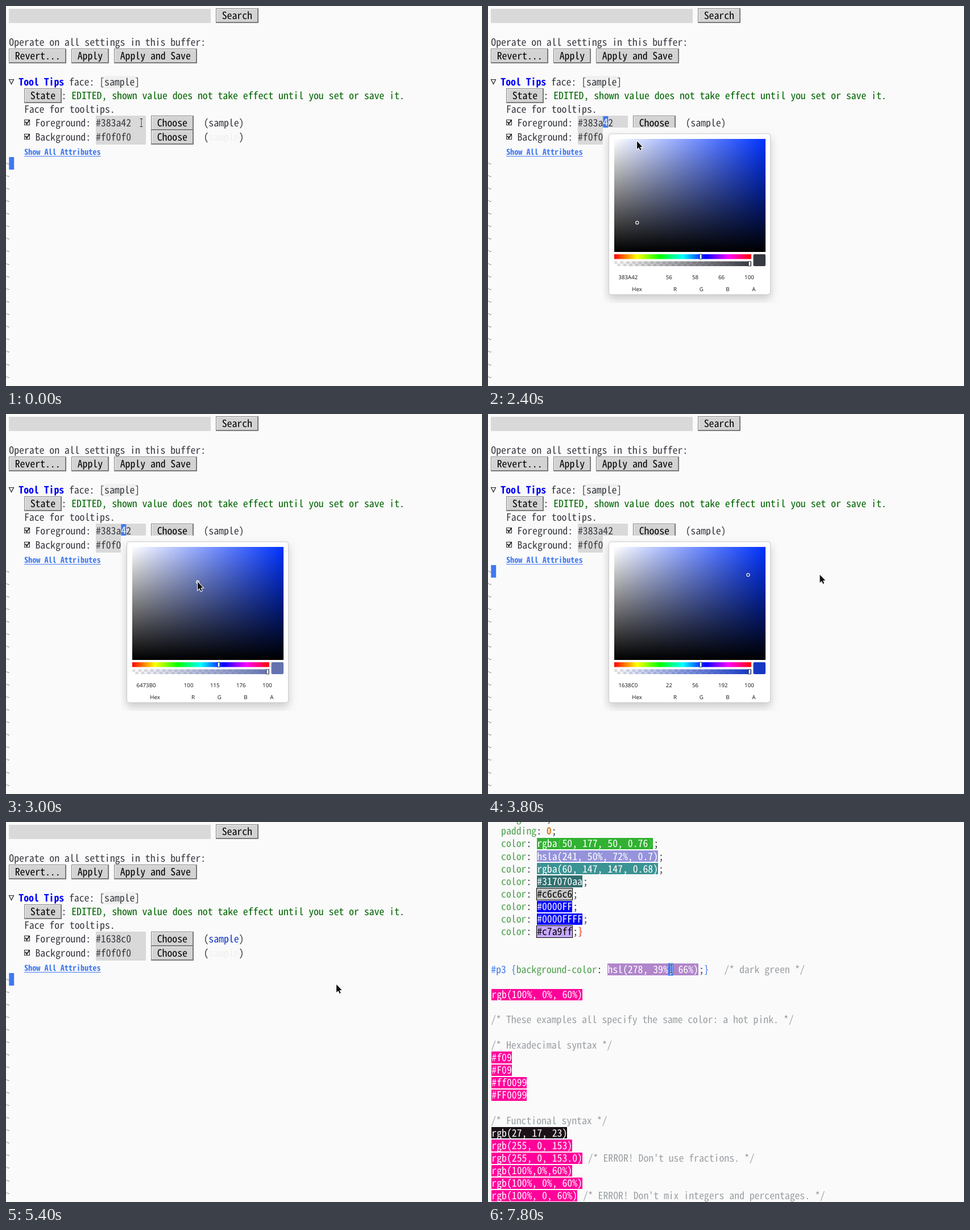
Animation, 837 px wide and 669 px high, one loop 8000 ms. Source, as an HTML page with a canvas:

```html
<!DOCTYPE html>
<html lang="en">
<head>
<meta charset="utf-8">
<title>Color picker</title>
<style>
  html, body { margin: 0; width: 100%; height: 100%; overflow: hidden; background: #fafafa; }
  canvas { display: block; }
</style>
</head>
<body>
<canvas id="stage" width="837" height="669"></canvas>
<script>
const ctx = document.getElementById('stage').getContext('2d');
const LOOP = 8000, ADV = 8.87, ROW = 22.14, LEFT = 5.3;
const MONO = '"Noto Sans Mono CJK JP", "Noto Sans Mono", monospace';
const BG = '#fafafa', INK = '#383a42', FIELD = '#d9d9d9', BLUE = '#4078f2';
const GREEN = '#50a14f', GREY = '#9ca0a4', PINK = '#ff0099';

ctx.textRendering = 'geometricPrecision';
ctx.font = '100px ' + MONO;
const EM = 100 / ctx.measureText('0').width;

function rect(x, y, w, h, color) {
  ctx.fillStyle = color;
  ctx.fillRect(x, y, w, h);
}

function shape(points, fill, stroke, width = 1) {
  ctx.beginPath();
  points.forEach(([x, y]) => ctx.lineTo(x, y));
  ctx.closePath();
  if (stroke) {
    ctx.strokeStyle = stroke;
    ctx.lineWidth = width;
    ctx.stroke();
  }
  if (fill) {
    ctx.fillStyle = fill;
    ctx.fill();
  }
}

// Text on the character grid, y is the middle of the row; returns the next x.
function type(x, y, str, color = INK, { bold = false, adv = ADV } = {}) {
  ctx.font = `${bold ? 'bold ' : ''}${adv * EM}px ${MONO}`;
  ctx.textAlign = 'left';
  ctx.fillStyle = color;
  const base = y + 6.3 * adv / ADV;
  for (const ch of str) {
    if (ch !== ' ') ctx.fillText(ch, x, base);
    x += adv;
  }
  return x;
}

function cell(x, y, ch = ' ') {
  rect(x, y - 11, ADV, 22, BLUE);
  type(x, y, ch, BG);
}

// Raised button: dark rim, light inner edge at the top left.
function button(x, y, label) {
  const w = Math.round((label.length + 2) * ADV + 3.6), h = 26;
  rect(x, y, w, h, '#7a7a7a');
  rect(x + 1, y + 1, w - 3, h - 3, '#f8f8f8');
  rect(x + 2, y + 2, w - 4, h - 4, '#d3d3d3');
  type(x + 1.8 + ADV, y + 13, label, '#000');
}

function checkbox(x, y) {
  ctx.strokeStyle = '#222';
  ctx.lineWidth = 1;
  ctx.strokeRect(x + .5, y + .5, 9, 9);
  ctx.lineWidth = 2;
  ctx.beginPath();
  ctx.moveTo(x + 2, y + 3.5);
  ctx.lineTo(x + 4.5, y + 7.5);
  ctx.lineTo(x + 9, y + 1);
  ctx.stroke();
}

function tildes() {
  ctx.strokeStyle = '#777';
  ctx.lineWidth = 1;
  for (let i = 0; i < 18; i++) {
    const y = Math.round(276.5 + i * 22.13) + .5;
    ctx.beginPath();
    ctx.moveTo(0, y - 1);
    ctx.bezierCurveTo(2, y - 1.5, 3, y + 2.5, 6, y);
    ctx.stroke();
  }
}

function attribute(y, label, value, sample) {
  checkbox(32, y - 6);
  type(51.5, y, label + ':');
  rect(158, y - 13, 88, 26, FIELD);
  type(158, y, value);
  button(255, y - 13, 'Choose');
  let x = type(347.5, y, '(');
  x = type(x, y, 'sample', sample);
  type(x, y, ')');
}

function settings(t) {
  const done = t >= 3900;
  const value = done ? '#1638c0' : '#383a42';

  rect(5, 5, 355, 25, FIELD);
  button(369, 4, 'Search');
  type(LEFT, 64, 'Operate on all settings in this buffer:');
  button(5, 75, 'Revert...');
  button(115, 75, 'Apply');
  button(190, 75, 'Apply and Save');

  shape([[5.5, 129.5], [13.5, 129.5], [9.5, 137.5]], null, '#222', 1.2);
  let x = type(22.3, 134, 'Tool Tips', '#0000ff', { bold: true });
  x = type(x, 134, ' face: [');
  rect(x, 123, 6 * ADV, 22, '#f0f0f0');
  type(x, 134, 'sample]');

  button(32, 145, 'State');
  x = type(97.5, 158, ': ');
  type(x, 158, 'EDITED, shown value does not take effect until you set or save it.', '#006400');
  type(32, 182, 'Face for tooltips.');
  attribute(206, 'Foreground', value, done ? '#1638c0' : INK);
  attribute(231, 'Background', '#f0f0f0', '#f0f0f0');
  type(32, 257, 'Show All Attributes', BLUE, { bold: true, adv: 7.08 });
  rect(32, 264, 134.5, 1, BLUE);
  tildes();

  if (t < 1300 || (t >= 3800 && t < 3900) || t >= 5400) cell(LEFT, 277);
  else if (done) cell(158 + 7 * ADV, 205);
  else cell(158 + 5 * ADV, 205, '4');

  if (t >= 2000 && t < 3900) rect(202, 214, 311, 309, BG);
  if (t >= 2100 && t < 3900) picker(t);
}

const PAD = { x: 222, y: 234, w: 266, h: 199 };

function blend(x0, y0, x1, y1, colors) {
  const g = ctx.createLinearGradient(x0, y0, x1, y1);
  colors.forEach((c, i) => g.addColorStop(i / (colors.length - 1), c));
  return g;
}

function pickedColor(t) {
  if (t < 2600) return { s: 10 / 66, v: 66 / 255, rgb: [56, 58, 66] };
  const [x, y] = pointerAt(Math.min(t, 3200));
  const s = (x - PAD.x) / PAD.w, v = (PAD.y + PAD.h - y) / PAD.h;
  const max = v * 255, min = max * (1 - s);
  return { s, v, rgb: [min, min + (max - min) * .2, max].map(Math.round) };
}

function handle(x, y) {
  rect(x - 2.5, y - .5, 5, 9.5, 'rgba(0,0,0,.6)');
  rect(x - 1.5, y + .5, 3, 7.5, '#fff');
}

function picker(t) {
  const { s, v, rgb } = pickedColor(t);
  const list = rgb.join(',');

  ctx.save();
  ctx.beginPath();
  ctx.rect(202, 214, 311, 309);
  ctx.clip();
  ctx.shadowColor = 'rgba(0,0,0,.2)';
  ctx.shadowBlur = 15;
  ctx.shadowOffsetY = 7;
  ctx.fillStyle = '#fff';
  ctx.beginPath();
  ctx.roundRect(212.5, 225, 284, 283, 4);
  ctx.fill();
  ctx.restore();
  ctx.strokeStyle = '#cbcbcb';
  ctx.lineWidth = 1;
  ctx.stroke();

  const { x, y, w, h } = PAD;
  rect(x, y, w, h, 'rgb(0,51,255)');
  rect(x, y, w, h, blend(x, 0, x + w, 0, ['#fff', 'rgba(255,255,255,0)']));
  rect(x, y, w, h, blend(0, y, 0, y + h, ['rgba(0,0,0,0)', '#000']));
  ctx.beginPath();
  ctx.arc(x + s * w, y + h - v * h, 2.6, 0, 7);
  ctx.strokeStyle = 'rgba(0,0,0,.4)';
  ctx.lineWidth = 2.4;
  ctx.stroke();
  ctx.strokeStyle = '#fff';
  ctx.lineWidth = 1.2;
  ctx.stroke();

  const hues = ['#f00', '#ff0', '#0f0', '#0ff', '#00f', '#f0f', '#f00'];
  rect(x, 437, 241, 8.5, blend(x, 0, x + 241, 0, hues));
  handle(374, 437);

  rect(x, 449.5, 241, 8.5, '#fff');
  for (let i = 0; i < 23; i++) {
    rect(x + i * 10.6, 449.5, 5.3, 4.25, '#dedede');
    if (i < 22) rect(x + i * 10.6 + 5.3, 453.75, 5.3, 4.25, '#dedede');
  }
  rect(x, 449.5, 241, 8.5, blend(x, 0, x + 241, 0, [`rgba(${list},0)`, `rgb(${list})`]));
  handle(460, 449.5);

  ctx.fillStyle = `rgb(${list})`;
  ctx.beginPath();
  ctx.roundRect(466.5, 437, 21.5, 21, 2);
  ctx.fill();

  const hex = rgb.map(n => n.toString(16).padStart(2, '0')).join('').toUpperCase();
  ctx.font = '9.7px "Noto Sans", sans-serif';
  ctx.fillStyle = '#222';
  [hex, ...rgb, 100].forEach((n, i) => {
    ctx.textAlign = 'left';
    ctx.fillText(n, i ? 266.7 + i * 46.1 : 229.5, 481.3);
    ctx.textAlign = 'center';
    ctx.fillText(['Hex', 'R', 'G', 'B', 'A'][i], i ? 283 + i * 46.1 : 262, 501.5);
  });
}

// A run is { str, color, bg, bold }. A run with a background is a chip,
// framed by one pixel in its text colour, which widens it by two.
function line(i, ...runs) {
  const y = 16 + i * ROW;
  let x = LEFT;
  for (const { str, color, bg, bold } of runs) {
    if (bg) {
      const left = Math.round(x), right = Math.round(x + str.length * ADV + 2);
      const top = Math.round(y - ROW / 2), bottom = Math.round(y + ROW / 2);
      rect(left, top, right - left, bottom - top, color);
      rect(left + 1, top + 1, right - left - 2, bottom - top - 2, bg);
      x = type(x + 1, y, str, color) + 1;
    } else {
      x = type(x, y, str, color, { bold });
    }
  }
}

const text = (str, color = INK, bold = false) => ({ str, color, bold });
const chip = (str, bg = PINK, color = '#fff') => ({ str, bg, color });
const note = str => text(str, GREY);

function declare(i, name, ...value) {
  line(i, text('  ' + name, GREEN), text(': '), ...value);
}

function stylesheet(t) {
  const end = text(';'), zero = text('0', '#da8030', true);

  declare(-1, 'margin', zero, end);
  declare(0, 'padding', zero, end);
  declare(1, 'color', chip('rgba 50, 177, 50, 0.76 ', 'rgb(50,177,50)'), end);
  type(LEFT + 1 + 13 * ADV, 16 + ROW, '(', '#40d048');
  type(LEFT + 1 + 31 * ADV, 16 + ROW, ')', '#40d048');
  declare(2, 'color', chip('hsla(241, 50%, 72%, 0.7)', 'hsl(241,50%,72%)'), end);
  declare(3, 'color', chip('rgba(60, 147, 147, 0.68)', 'rgb(60,147,147)'), end);
  declare(4, 'color', chip('#317070aa', '#317070'), end);
  declare(5, 'color', chip('#c6c6c6', '#c6c6c6', '#000'), end);
  declare(6, 'color', chip('#0000FF', '#0000ff'), end);
  declare(7, 'color', chip('#0000FFFF', '#0000ff'), end);
  declare(8, 'color', chip('#c7a9ff', '#c7a9ff', '#000'), end, text('}', '#ef6a55', true));

  line(11, text('#p3 {', BLUE), text('background-color', GREEN), text(': '),
    chip('hsl(278, 39%, 66%)', 'hsl(278,39%,66%)'), end, text('}', BLUE), note('   /* dark green */'));
  line(13, chip('rgb(100%, 0%, 60%)'));
  line(15, note('/* These examples all specify the same color: a hot pink. */'));
  line(17, note('/* Hexadecimal syntax */'));
  ['#f09', '#F09', '#ff0099', '#FF0099'].forEach((c, i) => line(18 + i, chip(c)));
  line(23, note('/* Functional syntax */'));
  line(24, chip('rgb(27, 17, 23)', 'rgb(27,17,23)'));
  line(25, chip('rgb(255, 0, 153)'));
  line(26, chip('rgb(255, 0, 153.0)'), note(" /* ERROR! Don't use fractions. */"));
  line(27, chip('rgb(100%,0%,60%)'));
  line(28, chip('rgb(100%, 0%, 60%)'));
  line(29, chip('rgb(100%, 0, 60%)'), note(" /* ERROR! Don't mix integers and percentages. */"));

  if (t < 7800) cell(LEFT + 1 + 30 * ADV, 38, '6');
  else cell(LEFT + 1 + 35 * ADV, 259.5, ',');
}

// Pointer keys: time, x, y.
const PATH = [
  [0, 238, 205.5], [100, 238, 205.5], [700, 204.5, 206], [800, 208, 206],
  [1000, 208, 206], [1100, 203.5, 206], [2300, 203.5, 206], [2400, 262, 238],
  [3000, 337, 295.8], [3200, 457.4, 283.2], [3700, 583.5, 283], [5100, 583.5, 283],
  [5400, 581, 286], [7300, 581, 286], [7700, 322.5, 258.5], [8000, 322.5, 258.5]
];

function pointerAt(t) {
  const i = Math.max(1, PATH.findIndex(k => k[0] >= t));
  const [t0, x0, y0] = PATH[i - 1], [t1, x1, y1] = PATH[i];
  const k = (t - t0) / (t1 - t0);
  return [x0 + (x1 - x0) * k, y0 + (y1 - y0) * k];
}

function beam(x, y) {
  for (const [color, width] of [['#fff', 2.6], ['#111', 1]]) {
    ctx.strokeStyle = color;
    ctx.lineWidth = width;
    ctx.beginPath();
    ctx.moveTo(x - 2.5, y - 7);
    ctx.lineTo(x + 2.5, y - 7);
    ctx.moveTo(x, y - 7);
    ctx.lineTo(x, y + 7);
    ctx.moveTo(x - 2.5, y + 7);
    ctx.lineTo(x + 2.5, y + 7);
    ctx.stroke();
  }
}

function arrow(x, y) {
  const tip = [[0, 0], [0, 14], [3.2, 11], [5.6, 16], [7.7, 15], [5.4, 10.2], [9.6, 10]];
  shape(tip.map(([dx, dy]) => [x + dx, y + dy]), '#111', '#fff', 2);
}

function draw(now) {
  const t = Math.floor(now % LOOP / 100) * 100;
  rect(0, 0, 837, 669, BG);
  (t < 6400 ? settings : stylesheet)(t);
  const [x, y] = pointerAt(t);
  (t < 2400 || t >= 7600 ? beam : arrow)(x, y);
}

const start = performance.now();
function tick() {
  draw(performance.now() - start);
  requestAnimationFrame(tick);
}
tick();
</script>
</body>
</html>
```
